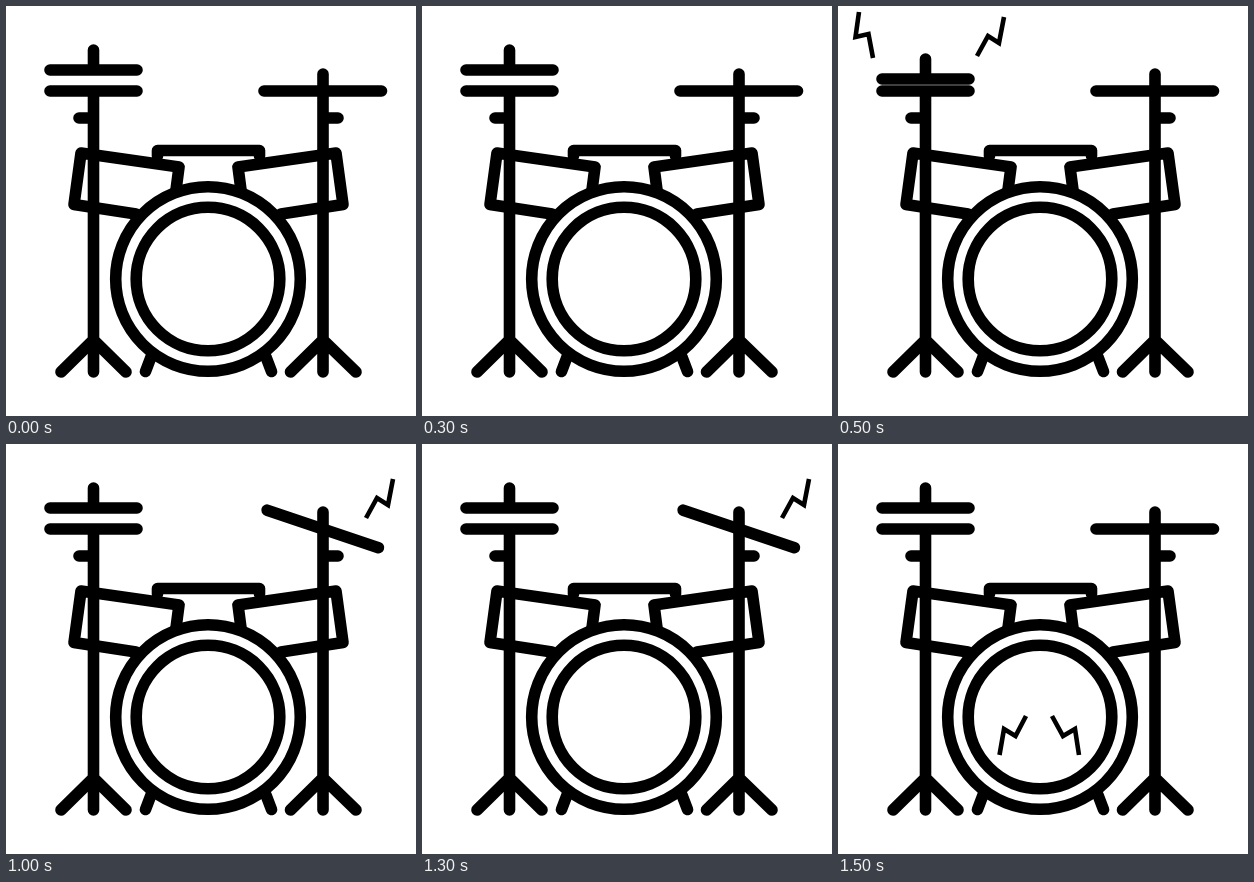
An HTML page for the animation above (2000 ms loop, 410 px wide and 410 px high).

```html
<!DOCTYPE html>
<html lang="en">
<head>
<meta charset="utf-8">
<title>Drum kit</title>
<style>
  html, body { margin: 0; width: 100%; height: 100%; overflow: hidden; background: #fff; }
  svg { display: block; width: 100vw; height: 100vh; }
  .kit { fill: none; stroke: #000; stroke-width: 11.6; stroke-linecap: round; stroke-linejoin: round; }
  .bolt { fill: none; stroke: #000; stroke-width: 4.6; stroke-linejoin: miter; }
</style>
</head>
<body>
<svg viewBox="0 0 410 410">
  <g class="kit">
    <!-- hi-hat -->
    <path id="hat" d="M87.5 44V64M44 64H131"/>
    <path d="M44 85H131M87.5 85V366M73 112H87.5M55 366L87.5 334L120 366"/>
    <!-- cymbal -->
    <path id="cymbal" d="M258 85H375.500"/>
    <path d="M317 68V366M317 112H332M284.500 366L317 334L350 366"/>
    <!-- toms and snare -->
    <path d="M130 208L68 198.500L75 147L173 161L170 184"/>
    <path d="M275 208L337 198.500L330 147L232 161L235 184"/>
    <path d="M151.500 150V144.500H253.500V150"/>
    <!-- bass drum -->
    <circle cx="202" cy="273" r="92.300"/>
    <circle cx="202" cy="273" r="71.800"/>
    <path d="M145 351L139.500 365.500M260 351L265.500 365.500"/>
  </g>
  <g id="hatHit" class="bolt">
    <path d="M21 6L17.500 31L30.500 28L35 52"/>
    <path d="M139 50L150 30L161 37L166 11"/>
  </g>
  <path id="cymbalHit" class="bolt" d="M360 74L371 54L382 61L387 35"/>
  <g id="bassHit" class="bolt">
    <path d="M188 272L177.500 292L166 285L161.500 311"/>
    <path d="M214 272L225 292L237 285L241 311"/>
  </g>
</svg>
<script>
  const BEAT = 500;
  const BEATS = 4;
  const el = id => document.getElementById(id);
  const hits = ["hatHit", "cymbalHit", "bassHit"].map(el);
  const hat = el("hat");
  const cymbal = el("cymbal");

  // Beat 0 rests; beats 1 to 3 strike hi-hat, cymbal and bass drum.
  function draw(time) {
    const beat = Math.floor(time / BEAT) % BEATS;
    hits.forEach((hit, i) => hit.setAttribute("visibility", beat === i + 1 ? "visible" : "hidden"));
    hat.setAttribute("transform", `translate(0 ${beat === 1 ? 9 : 0})`);
    cymbal.setAttribute("transform", `rotate(${beat === 2 ? 18.6 : 0} 317 85)`);
  }

  const start = performance.now();
  function tick() {
    draw(performance.now() - start);
    requestAnimationFrame(tick);
  }
  tick();
</script>
</body>
</html>
```
